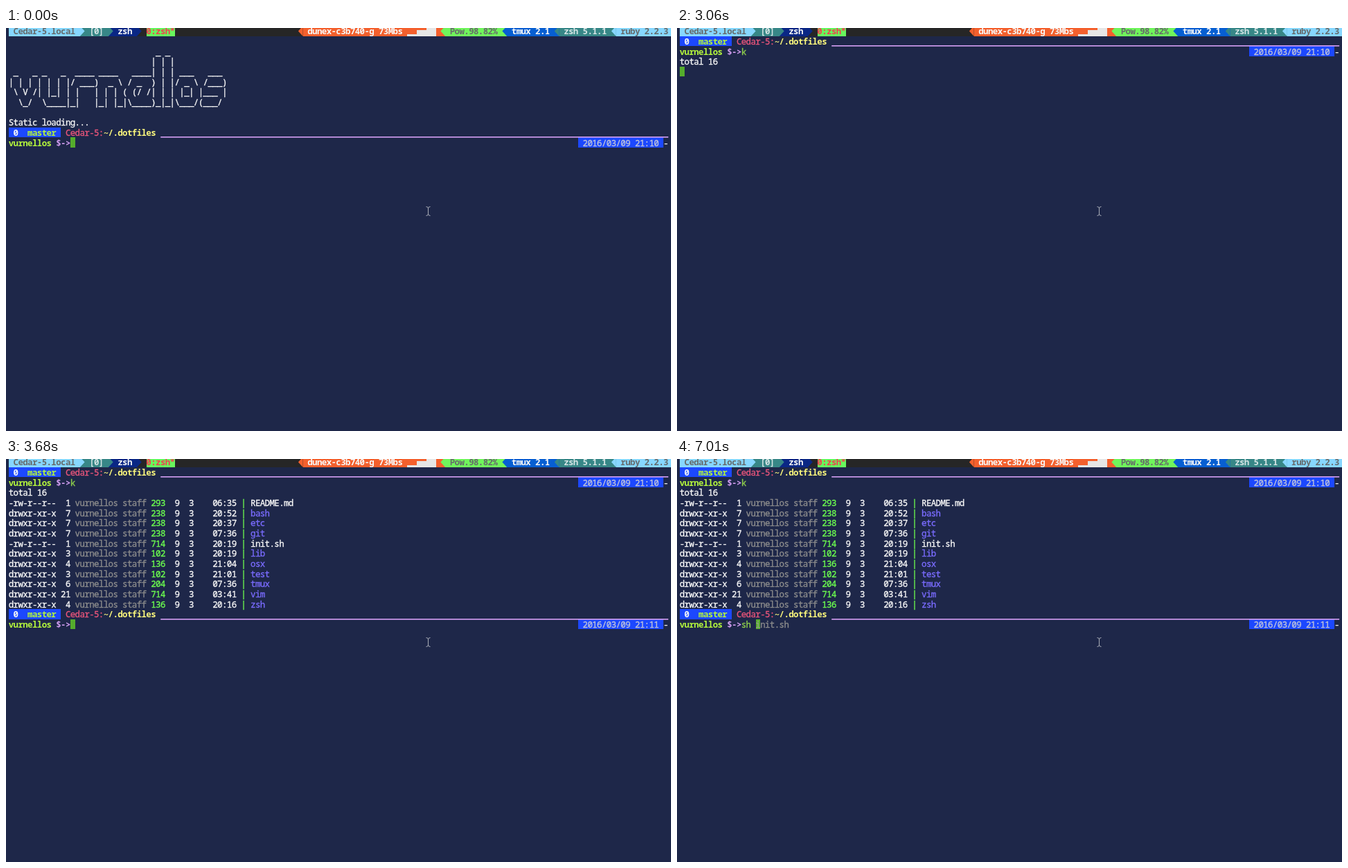
Animation, 960 px wide and 583 px high, one loop 7.99 s. Source, as an HTML page with a canvas:

```html
<!DOCTYPE html>
<html lang="en">
<head>
<meta charset="utf-8">
<title>Terminal session</title>
<style>
  html, body { margin: 0; width: 100%; height: 100%; overflow: hidden; background: #1e2749; }
  canvas { display: block; }
</style>
</head>
<body>
<canvas id="term" width="960" height="583"></canvas>
<script>
const ctx = document.getElementById('term').getContext('2d');

const LOOP = 7990;
const CELL_W = 6.85, CELL_H = 14.68, LEFT = 4, TOP = -2.6, BASELINE = 11.8;
const FONT = '12.4px "Noto Sans Mono", "DejaVu Sans Mono", monospace';
const COLS = 139;

const USER = 'vurnellos', HOST = 'Cedar-5';
const C = {
  bg: '#1e2749', bar: '#262626', white: '#f8f8f8', gray: '#8c8c8c', dim: '#666b6b',
  sky: '#87d7ff', teal: '#378787', navy: '#0a2785', orange: '#f4602d', lime: '#70f55c',
  azure: '#075fd2', blue: '#1c48ff', green: '#6dff4f', leaf: '#b4f53c', pink: '#e8557a',
  yellow: '#fbf77c', purple: '#d6a0f5', dir: '#7a6cff', cursor: '#55ad2c', typed: '#8fd04c'
};

const LOGO = String.raw`
                               _ _
                              | | |
 _   _ _   _  ____ ____   ____| | | ___   ___
| | | | | | |/ ___)  _ \ / _  ) | |/ _ \ /___)
 \ V /| |_| | |   | | | ( (/ /| | | |_| |___ |
  \_/  \____|_|   |_| |_|\____)_|_|\___/(___/`.split('\n').slice(1);

// links, size, time, name
const FILES = [
  [1, 293, '06:35', 'README.md'], [7, 238, '20:52', 'bash'], [7, 238, '20:37', 'etc'],
  [7, 238, '07:36', 'git'], [1, 714, '20:19', 'init.sh'], [3, 102, '20:19', 'lib'],
  [4, 136, '21:04', 'osx'], [3, 102, '21:01', 'test'], [6, 204, '07:36', 'tmux'],
  [21, 714, '03:41', 'vim'], [4, 136, '20:16', 'zsh']
];

// time, number of listed files
const LISTING = [[3060, 0], [3240, 3], [3330, 6], [3510, 9], [3600, 11]];

const colX = col => LEFT + col * CELL_W;
const rowY = row => Math.floor(TOP + row * CELL_H);

function rect(x, y, w, h, color) {
  ctx.fillStyle = color;
  ctx.fillRect(x, y, w, h);
}

function fillCells(col, row, count, color) {
  const x = Math.round(colX(col)), y = rowY(row);
  rect(x, y, Math.round(colX(col + count)) - x, rowY(row + 1) - y, color);
}

// One glyph centred in each cell; a hairline stroke thickens regular text.
function write(col, row, text, color, bold) {
  const y = Math.round(TOP + row * CELL_H + BASELINE);
  ctx.font = (bold ? 'bold ' : '500 ') + FONT;
  ctx.textAlign = 'center';
  ctx.fillStyle = ctx.strokeStyle = color;
  ctx.lineWidth = 0.35;
  [...text].forEach((ch, i) => {
    if (ch === ' ') return;
    const x = colX(col + i + 0.5);
    ctx.fillText(ch, x, y);
    if (!bold) ctx.strokeText(ch, x, y);
  });
}

// Triangle filling one cell of the status bar; dir 1 points right, -1 left.
function arrow(col, dir, color) {
  const base = colX(dir > 0 ? col : col + 1);
  const top = rowY(0), bottom = rowY(1);
  ctx.fillStyle = color;
  ctx.beginPath();
  ctx.moveTo(base, top);
  ctx.lineTo(base + dir * CELL_W, (top + bottom) / 2);
  ctx.lineTo(base, bottom);
  ctx.fill();
}

function statusBar() {
  fillCells(0, 0, COLS, C.bar);
  const left = [
    [0, 15, C.sky, HOST + '.local', C.dim],
    [15, 21, C.teal, '[0]', '#d5e4e4'],
    [21, 27, C.navy, 'zsh', C.white]
  ];
  for (const [from, to, color] of left) fillCells(from, 0, to - from, color);
  for (const [from, to, color, text, ink] of left) {
    arrow(to, 1, color);
    write(from ? from + 2 : 1, 0, text, ink, true);
  }
  fillCells(29, 0, 6, '#68f75d');
  write(29, 0, '0:zsh*', '#f0414f', true);

  const right = [
    [61, C.orange, 'dunex-c3b740-g 73Mbs', C.white],
    [91, C.lime, 'Pow.98.82%', C.dim],
    [104, C.azure, 'tmux 2.1', C.white],
    [115, C.teal, 'zsh 5.1.1', '#d5e4e4'],
    [127, C.sky, 'ruby 2.2.3', C.dim]
  ];
  for (const [col, color, text, ink] of right) {
    arrow(col, -1, color);
    fillCells(col + 1, 0, COLS - col, color);
    write(col + 2, 0, text, ink, true);
  }
  [3, 9, 12].forEach((h, i) => rect(Math.round(colX(84 + 2 * i)), 12 - h, 14, h, '#e6e6e6'));
}

function prompt(row, clock) {
  fillCells(0, row, 11, C.blue);
  write(1, row, '0', C.white, true);
  write(4, row, 'master', C.leaf, true);
  write(12, row, HOST + ':', C.pink);
  write(20, row, '~/.dotfiles', C.yellow, true);

  write(0, row + 1, USER, C.leaf, true);
  write(10, row + 1, '$->', C.purple, true);
  fillCells(120, row + 1, 18, C.blue);
  write(121, row + 1, '2016/03/09 ' + clock, '#c0c4d8');
  write(138, row + 1, '-', C.white);
  rect(colX(32), rowY(row + 1) - 1, colX(COLS) - colX(32), 1.6, C.purple);
}

// Typed part, suggested rest, and the cursor between them.
function input(row, line, typed) {
  const col = 13 + typed;
  write(13, row, line.slice(0, typed), C.typed);
  write(col, row, line.slice(typed), C.gray);
  fillCells(col, row, 1, C.cursor);
  write(col, row, line.slice(typed, typed + 1), '#94a383');
}

function fileRow(row, [links, size, time, name]) {
  const plain = name.includes('.');
  write(0, row, plain ? '-rw-r--r--' : 'drwxr-xr-x', C.white);
  write(11, row, String(links).padStart(2), C.white);
  write(14, row, USER + ' staff', C.gray);
  write(30, row, String(size), C.green);
  write(35, row, '9  3', C.white);
  write(43, row, time, C.white);
  write(49, row, '|', C.green);
  write(51, row, name, plain ? C.white : C.dir);
}

function pointer() {
  const x = 609.5;
  ctx.strokeStyle = '#a9adb8';
  ctx.lineWidth = 1;
  ctx.beginPath();
  for (const side of [-3, 3]) {
    ctx.moveTo(x + side, 258.5);
    ctx.quadraticCurveTo(x, 258.5, x, 261);
    ctx.lineTo(x, 269);
    ctx.quadraticCurveTo(x, 271.5, x + side, 271.5);
  }
  ctx.stroke();
}

function greeting() {
  LOGO.forEach((line, i) => write(0, 2 + i, line, C.white));
  write(0, 9, 'Static loading...', C.white);
  prompt(10, '21:10');
  input(11, '', 0);
}

function session(t) {
  prompt(1, '21:10');
  if (t < 2700) return input(2, '', 0);
  if (t < 3060) return input(2, 'kome lv255380767', 1);

  write(13, 2, 'k', C.typed);
  write(0, 3, 'total 16', C.white);
  const count = LISTING.filter(([at]) => t >= at).pop()[1];
  FILES.slice(0, count).forEach((file, i) => fileRow(4 + i, file));
  if (t < 3680) return fillCells(0, 4 + count, 1, C.cursor);

  prompt(15, '21:11');
  const typed = t < 6650 ? 0 : t < 6740 ? 1 : t < 7010 ? 2 : 3;
  input(16, typed ? 'sh init.sh' : '', typed);
}

const start = performance.now();

function frame() {
  const t = (performance.now() - start) % LOOP;
  rect(0, 0, 960, 583, C.bg);
  statusBar();
  if (t < 720) greeting();
  else session(t);
  pointer();
  requestAnimationFrame(frame);
}
frame();
</script>
</body>
</html>
```
